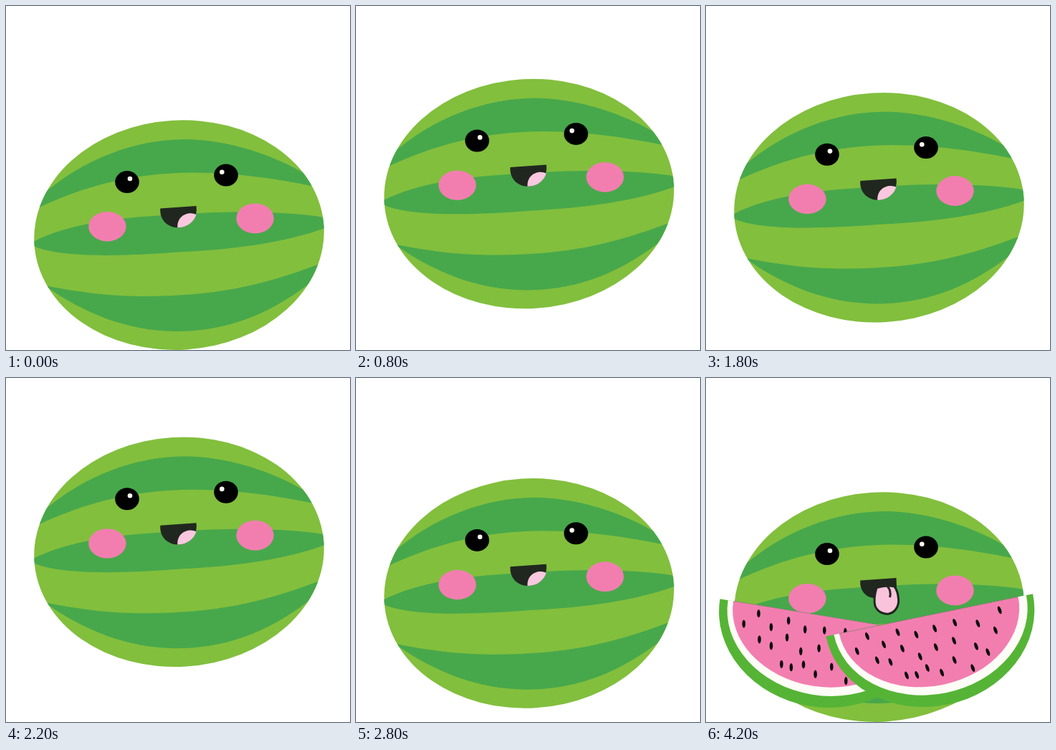
Recreate the animation shown at these times as an HTML page. Size 480 by 480 pixels, loop 4.7 s.

```html
<!DOCTYPE html>
<html lang="en">
<head>
<meta charset="utf-8">
<title>Bouncing watermelon</title>
<style>
  html, body { margin: 0; width: 100%; height: 100%; overflow: hidden; background: #fff; }
  svg { display: block; width: 100%; height: 100%; }
</style>
</head>
<body>
<svg viewBox="0 0 480 480">
  <defs>
    <clipPath id="rind">
      <ellipse cx="241.5" cy="319.6" rx="202.4" ry="160.1" transform="rotate(-3.6 241.5 319.6)"/>
    </clipPath>
    <!-- Drawn around the middle of its cut edge -->
    <g id="slice" transform="rotate(9.3)">
      <path fill="#55b435" d="M-147.4 0A147.4 127.4 0 0 0 147.4 0Z"/>
      <path fill="#fdfcf6" d="M-136 0A137 111 0 0 0 138 0Z"/>
      <path fill="#f27eb0" d="M-128.5 0A127.5 99 0 0 0 126.5 0Z"/>
      <path stroke="#3d5b35" stroke-width=".4" d="M-128 0H126"/>
      <g id="seeds" fill="#0c0c0c"></g>
    </g>
  </defs>

  <g id="melon">
    <g clip-path="url(#rind)">
      <path fill="#82bf3d" d="M0 140H480V490H0Z"/>
      <g fill="#47a84b">
        <path d="M50 264C110 212 180 187 248 186C310 186 375 208 424 238L432 252
                 C380 242 330 233 260 232.5C180 233 110 250 40 284Z"/>
        <path d="M36 330C80 306 150 295 230 291.5C300 286 390 285 450 296V308
                 C395 329 320 340 245 343C170 349 75 353 36 334Z"/>
        <path d="M54 390C110 401 150 405 195 405C290 404 350 393 440 359L425 386
                 C360 436 300 454 236 454C170 453 110 430 54 390Z"/>
      </g>
    </g>
    <g fill="#f27eb0">
      <ellipse cx="141.4" cy="307.7" rx="26.2" ry="20.7"/>
      <ellipse cx="347.5" cy="296.4" rx="26.2" ry="20.9"/>
    </g>
    <ellipse cx="169" cy="245.6" rx="16.8" ry="15.5"/>
    <ellipse cx="307" cy="236" rx="16.8" ry="15.5"/>
    <g fill="#fff8f2">
      <circle cx="173" cy="241" r="3.3"/>
      <circle cx="301.3" cy="231.7" r="3.3"/>
    </g>
    <g id="smile">
      <path fill="#20271f" d="M215.3 282.5L265.5 279C268 296 256 309.3 240 309.3C224 309 214 297 215.3 282.5Z"/>
      <path fill="#f9c8de" d="M239.3 309.3C238.5 297 247 289.3 258 289.3Q262 289.3 265.5 291C262 302 252 309.5 239.3 309.3Z"/>
    </g>
    <g id="tongue" stroke="#20271f" stroke-width="3">
      <path fill="#20271f" stroke="none" d="M215.3 282.5L265.5 279L266 292L238 307C224 308 214 297 215.3 282.5Z"/>
      <path fill="#f9c3dc" d="M238 292.5C235.5 301 234 311 236 318C239 326 247 330 255 329
                              C265 327 269.5 317 268.5 308C268 300 266 295 263 291C255 289 246 290 238 292.5Z"/>
      <path fill="none" d="M253 290.5Q259 297 256.5 306"/>
    </g>
  </g>
  <use id="leftSlice" href="#slice" transform="translate(165 332)"/>
  <use id="rightSlice" href="#slice" transform="translate(311.7 330.8) rotate(-20.9)"/>
</svg>
<script>
  const LOOP = 4700, STEP = 200;
  const byId = id => document.getElementById(id);

  // A row of seeds zigzags about its depth; the gaps widen to the right and the zigzag slowly flips
  function seedRow({ count, left, gap, depth, drift, phase }) {
    return Array.from({ length: count }, (_, i) => {
      const x = left + gap * i + 1.1 * i * i;
      const y = depth + 9 * Math.cos(Math.PI * i) * Math.cos(drift * i + phase);
      return `<ellipse rx="2.3" ry="5.6" transform="translate(${x} ${y}) rotate(-9.3)"/>`;
    }).join('');
  }

  byId('seeds').innerHTML = [
    { count: 9, left: -109, gap: 17, depth: 20, drift: 0.31, phase: 0 },
    { count: 8, left: -84, gap: 16.6, depth: 47, drift: 0.75, phase: Math.PI / 2 },
    { count: 7, left: -48, gap: 13, depth: 76, drift: 0.25, phase: Math.PI / 2 }
  ].map(seedRow).join('');

  // Rises from zero in even steps to its peak, then falls the same way
  function hop(step, stepsUp, rise) {
    return rise * Math.max(0, stepsUp - Math.abs(step - stepsUp));
  }

  // A tall hop, then a lower one that lingers on its first step
  function hopHeight(time) {
    const step = Math.floor(time / STEP);
    return step < 7 ? hop(step, 3, 28.8) : hop(Math.max(step, 8) - 7, 4, 19.2);
  }

  function show(id, visible) {
    byId(id).style.display = visible ? '' : 'none';
  }

  function draw(now) {
    const time = now % LOOP;
    byId('melon').setAttribute('transform', `translate(0 ${-hopHeight(time)})`);
    show('leftSlice', time >= 3200);
    show('rightSlice', time >= 3700);
    show('smile', time < 4200);
    show('tongue', time >= 4200);
  }

  const start = performance.now();
  function tick() {
    draw(performance.now() - start);
    requestAnimationFrame(tick);
  }
  tick();
</script>
</body>
</html>
```
